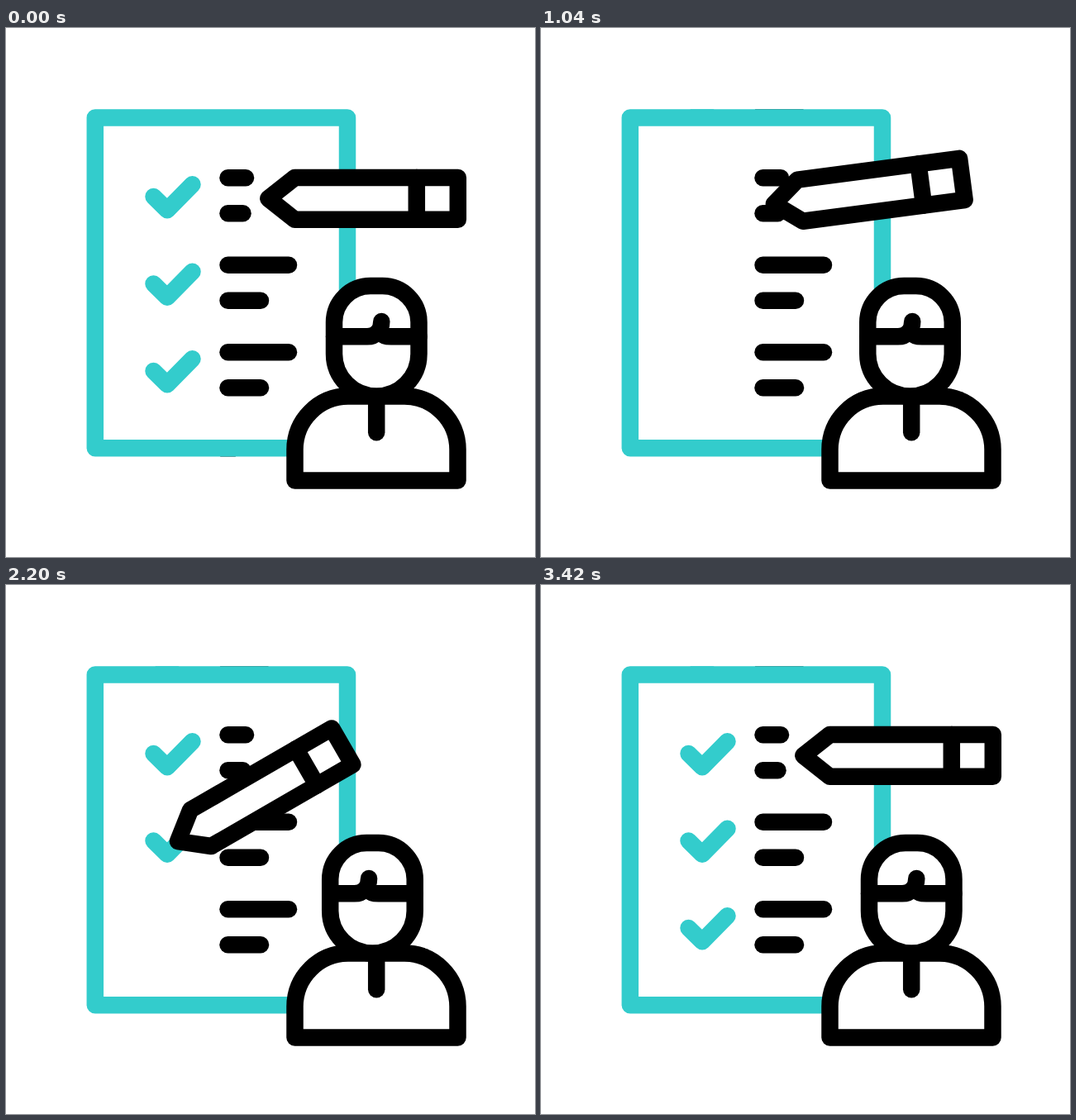
Recreate the animation shown at these times as an HTML page. Size 640x640 px, loop 3.62 s.

```html
<!DOCTYPE html>
<html lang="en">
<head>
<meta charset="utf-8">
<title>Checklist</title>
<style>
  html, body { margin: 0; width: 100%; height: 100%; overflow: hidden; background: #fff; }
  svg { display: block; width: 100vw; height: 100vh; }
  .ink, .teal { fill: none; stroke: #000; stroke-width: 20.5; stroke-linecap: round; stroke-linejoin: round; }
  .teal { stroke: #3cc; }
  .solid { fill: #fff; }
</style>
</head>
<body>
<svg viewBox="0 0 640 640">
  <clipPath id="sheet"><rect x="98" y="98.3" width="325" height="420.2"/></clipPath>
  <g clip-path="url(#sheet)"><g id="list"></g></g>
  <rect class="teal" x="107.8" y="108.5" width="305.2" height="399.7"/>

  <path class="ink solid" d="M349.5 547.5V510A64.5 64.5 0 0 1 414 445.5H482A64.5 64.5 0 0 1 546.5 510V547.5Z"/>
  <path class="ink" d="M448.2 445.5V489.3"/>
  <g id="head">
    <path class="ink solid" d="M397 356A44 44 0 0 1 441 312H455.500A44 44 0 0 1 499.500 356V394.300A51.250 51.250 0 0 1 397 394.300Z"/>
    <path class="ink" id="hair"/>
  </g>

  <g id="pencil">
    <path class="ink solid" d="M0 0L32-25.300H229.500V25.300H32Z"/>
    <path class="ink" d="M179.500-25.300V25.300"/>
  </g>
</svg>
<script>
const STEP = 20, LOOP = 3620, LAST = 171;
const PITCH = 105.5, SCROLL = 333;
const $ = id => document.getElementById(id);

const clamp = v => Math.max(0, Math.min(1, v));
const ease = v => (1 - Math.cos(Math.PI * clamp(v))) / 2;
const span = (f, a, b) => ease((f - a) / (b - a));
const mix = (a, b, p) => a + (b - a) * p;

// Eased value from a table of [frame, value]
function track(keys, f) {
  let v = keys[0][1];
  for (let i = 1; i < keys.length; i++) {
    const [a, from] = keys[i - 1], [b, to] = keys[i];
    if (f >= a) v = mix(from, to, span(f, a, b));
  }
  return v;
}

function add(cls, d) {
  const el = document.createElementNS('http://www.w3.org/2000/svg', 'path');
  el.setAttribute('class', cls);
  el.setAttribute('d', d);
  $('list').append(el);
  return el;
}

const lineEnd = row => row ? [342, 308] : [290, 286.5];
const linePath = (x, y) => `M268.5 ${y}H${x}`;
const checkPath = y => `M178.500 ${y + 22.7}L195 ${y + 38.9}L225.500 ${y + 8}`;

const growAt = [-3, 2, 9, 12, 16, 20];
const drawAt = [[62, 82], [98, 117], [133, 153]];
const lines = [], checks = [];

for (const shift of [0, SCROLL]) {
  for (let row = 0; row < 3; row++) {
    const y = 181.3 + row * PITCH + shift;
    const check = add('teal', checkPath(y));
    lineEnd(row).forEach((end, i) => {
      const ly = y + i * 43;
      const el = add('ink', linePath(end, ly));
      if (shift) lines.push({ el, end, y: ly, start: growAt[row * 2 + i] });
    });
    if (shift) {
      check.setAttribute('pathLength', 1);
      checks.push(check);
    }
  }
}

const stroke = [[175.5, 204], [192, 219.5], [222, 191.5]];
const home = [317.3, 206.4];
const BEND = 0.36;

function alongCheck(p, row) {
  const i = p < BEND ? 0 : 1;
  const q = i ? (p - BEND) / (1 - BEND) : p / BEND;
  const [a, b] = [stroke[i], stroke[i + 1]];
  return [mix(a[0], b[0], q), mix(a[1], b[1], q) + row * PITCH];
}

function travel(from, to, p, sag = 0) {
  return [mix(from[0], to[0], p), mix(from[1], to[1], p) + sag * Math.sin(Math.PI * p)];
}

function tipAt(f) {
  if (f < drawAt[0][0]) return travel(home, stroke[0], span(f, 47, drawAt[0][0]), 10);
  for (let row = 0; row < 3; row++) {
    const [a, b] = drawAt[row];
    if (f <= b) return alongCheck(span(f, a, b), row);
    const next = drawAt[row + 1];
    if (next && f < next[0]) {
      return travel(alongCheck(1, row), alongCheck(0, row + 1), span(f, b, next[0]));
    }
  }
  return travel(alongCheck(1, 2), home, span(f, drawAt[2][1], LAST));
}

const tilt = [[47, 0], [62, -30], [153, -30], [LAST, 0]];
const headX = [[38, 0], [82, -7.5], [97, -7.5], [145, 8.4], [LAST, 0]];
const faceX = [[38, 0], [82, -14.5], [97, -14.5], [145, 9.3], [LAST, 0]];

function hairPath(x) {
  return `M397 373.300H${437 + x}C${447 + x} 373.300 ${454.300 + x} 366 ${454.300 + x} 355` +
    `M${454 + x} 369.500C${456 + x} 372 ${461 + x} 373.300 ${466 + x} 373.300H499.500`;
}

function draw(f) {
  $('list').setAttribute('transform', `translate(0 ${-SCROLL * span(f, 0, 25)})`);
  for (const l of lines) {
    const p = f ? span(f, l.start, l.start + 20) : 0;
    l.el.setAttribute('d', linePath(mix(268.51, l.end, p), l.y));
  }
  checks.forEach((el, row) => {
    const p = span(f, ...drawAt[row]);
    el.style.visibility = p > 0 ? 'visible' : 'hidden';
    el.style.strokeDasharray = p < 1 ? `${p} 2` : 'none';
  });
  const [x, y] = tipAt(f);
  $('pencil').setAttribute('transform', `translate(${x} ${y}) rotate(${track(tilt, f)})`);
  $('head').setAttribute('transform', `translate(${track(headX, f)} 0)`);
  $('hair').setAttribute('d', hairPath(track(faceX, f)));
}

const began = performance.now();
function tick() {
  const t = (performance.now() - began) % LOOP;
  draw(Math.min(LAST, Math.floor(t / STEP)));
  requestAnimationFrame(tick);
}
tick();
</script>
</body>
</html>
```
